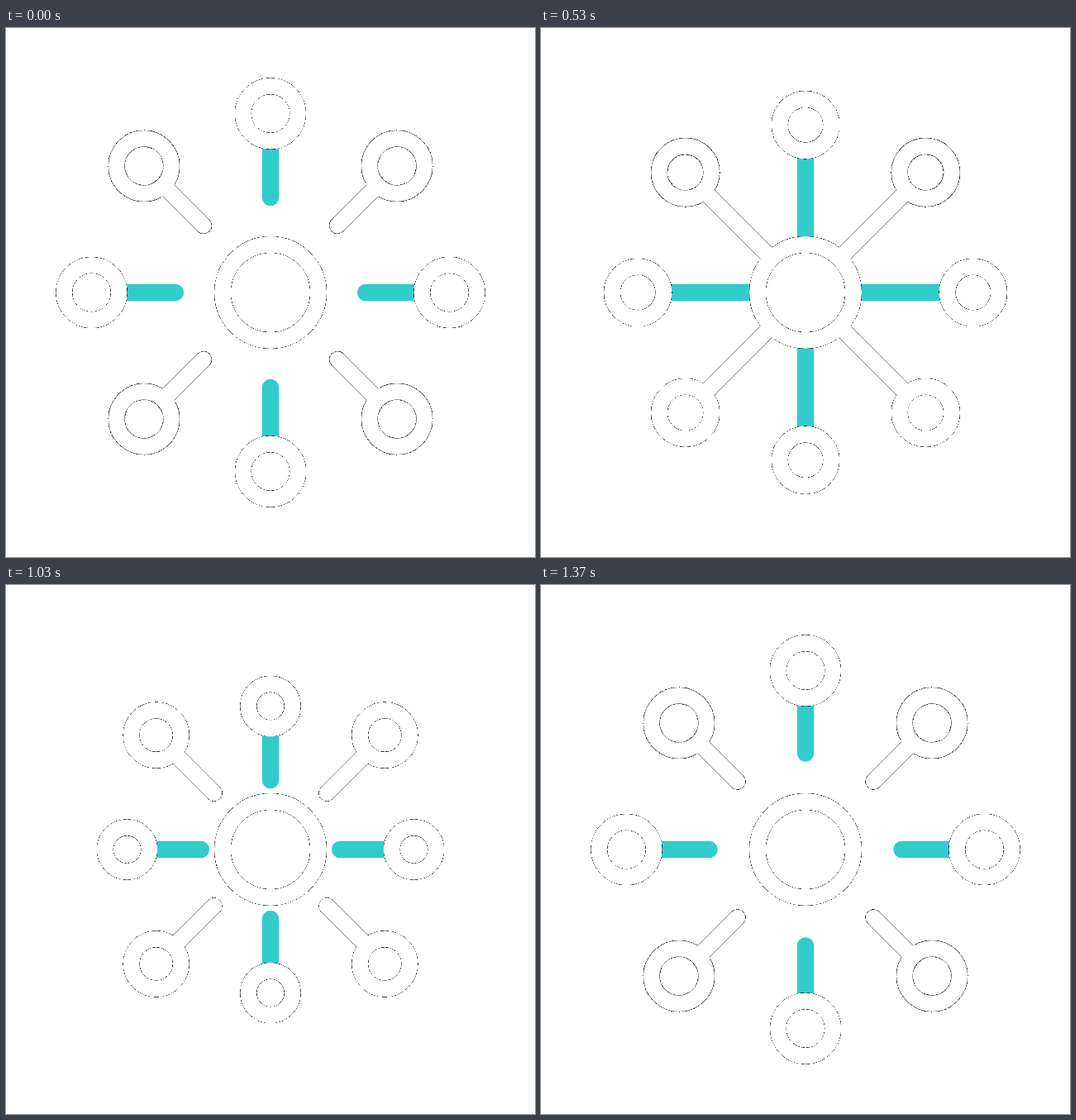
These frames come from a looping animation (640x640 px, 1.67 s). An HTML page:

```html
<!DOCTYPE html>
<html lang="en">
<head>
<meta charset="utf-8">
<title>Hub and spokes</title>
<style>
  html, body { margin: 0; width: 100%; height: 100%; overflow: hidden; background: #fff; }
  svg { display: block; width: 100vw; height: 100vh; }
  g { fill: none; stroke-linecap: round; }
  .teal { stroke: #32cccb; stroke-width: 20.5; }
  .paper { stroke: #fff; stroke-width: 20; filter: url(#rim); }
</style>
</head>
<body>
<svg viewBox="0 0 640 640">
  <!-- Darkens only the soft edge pixels of the white shapes. -->
  <filter id="rim" filterUnits="userSpaceOnUse" x="-320" y="-320" width="640" height="640"
          color-interpolation-filters="sRGB">
    <feComponentTransfer in="SourceGraphic" result="ink">
      <feFuncR type="linear" slope="0"/>
      <feFuncG type="linear" slope="0"/>
      <feFuncB type="linear" slope="0"/>
      <feFuncA type="discrete" tableValues="0 0 0 .85 .75 .65 .5 .4 .25 0"/>
    </feComponentTransfer>
    <feMerge>
      <feMergeNode in="SourceGraphic"/>
      <feMergeNode in="ink"/>
    </feMerge>
  </filter>
  <g transform="translate(320 320)">
    <g class="teal"></g>
    <g class="paper"><circle r="58"/></g>
  </g>
</svg>
<script>
const LOOP = 1670, STEP = 100 / 3;
const REST = { node: 216.5, tip: 116.5, radius: 33.3 };

// Each phase is [start, end] in ms.
const straight = { travel: 73, grow: [-50, 470], pull: [415, 842], push: [792, 1340], parts: [] };
const diagonal = { travel: 58, grow: [-45, 358], pull: [448, 756], push: [766, 1216], parts: [] };

const layer = name => document.querySelector('.' + name);

function set(el, attrs) {
  for (const key in attrs) el.setAttribute(key, attrs[key]);
}

function add(parent, tag, attrs = {}) {
  const el = document.createElementNS('http://www.w3.org/2000/svg', tag);
  set(el, attrs);
  return parent.appendChild(el);
}

function addSpoke(kind, angle) {
  const spot = name => add(layer(name), 'g', { transform: `rotate(${angle})` });
  const paper = spot('paper');
  kind.parts.push({
    bar: add(kind === straight ? spot('teal') : paper, 'line'),
    ring: add(paper, 'circle')
  });
}

for (let i = 0; i < 8; i++) addSpoke(i % 2 ? diagonal : straight, i * 45);

function ease(t, [from, to]) {
  const x = Math.min(1, Math.max(0, (t - from) / (to - from)));
  return x * x * (3 - 2 * x);
}

function pose(kind, t) {
  const stay = 1 - ease(t, kind.push);
  const shift = kind.travel * ease(t, kind.pull) * stay;
  const node = REST.node - shift;
  const radius = REST.radius - 0.152 * shift;
  const tip = REST.tip - 55 * ease(t, kind.grow) * stay;
  for (const { bar, ring } of kind.parts) {
    set(bar, { x1: tip, x2: node - radius - 3 });
    set(ring, { cx: node, r: radius });
  }
}

function draw(now) {
  const t = Math.floor((now % LOOP + 5) / STEP) * STEP;
  pose(straight, t);
  pose(diagonal, t);
}

const origin = performance.now();
function tick() {
  draw(performance.now() - origin);
  requestAnimationFrame(tick);
}
tick();
</script>
</body>
</html>
```
